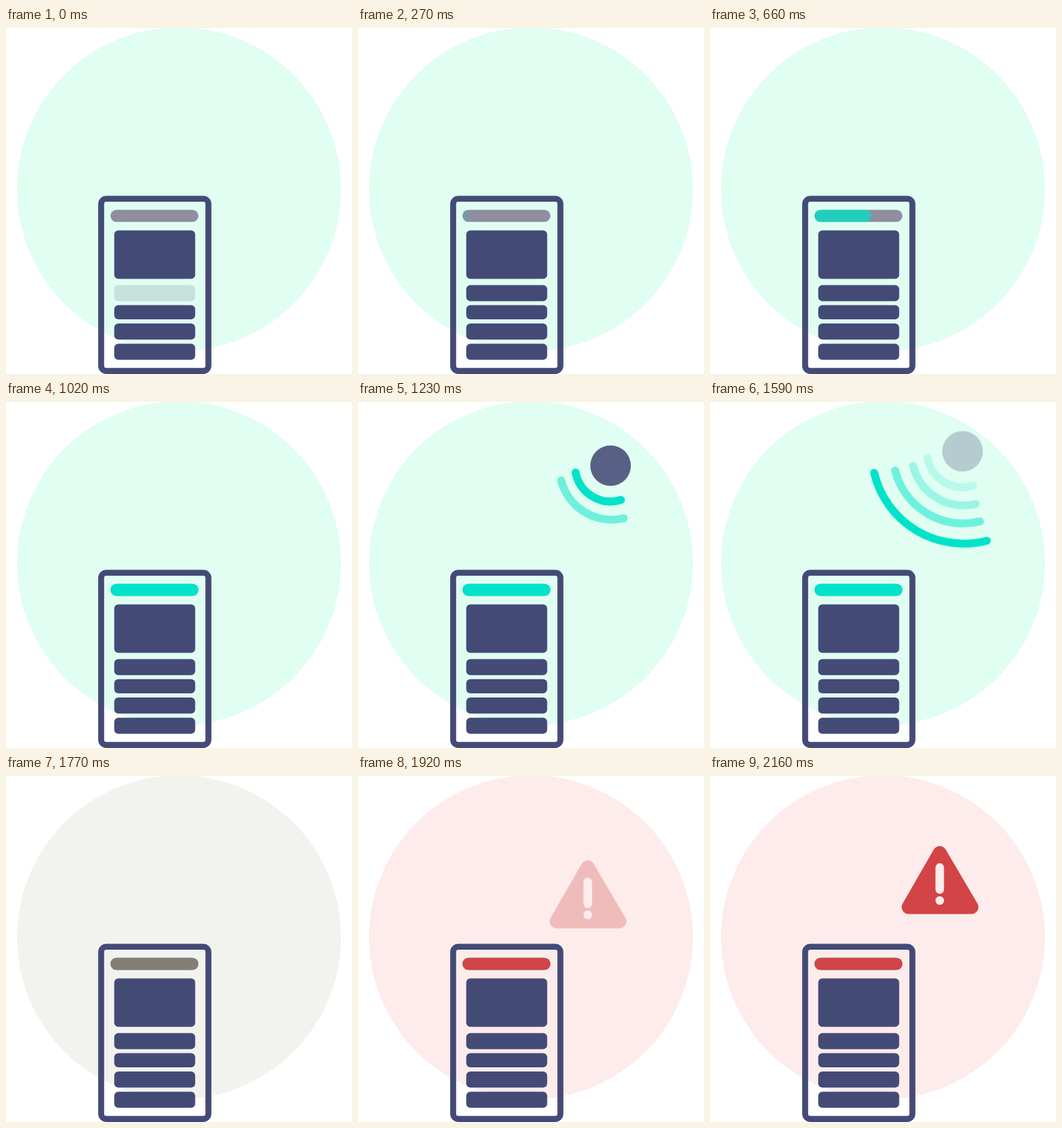
These frames come from a looping animation (500x500 px, 2.67 s). An HTML page:

```html
<!DOCTYPE html>
<html lang="en">
<head>
<meta charset="utf-8">
<title>Phone signal alert</title>
<style>
  :root {
    --navy: #444a76;
    --teal: #00e3c8;
    --red: #d24446;
    --mint: #e0fef2;
    --blush: #fdeceb;
  }
  html, body { margin: 0; width: 100%; height: 100%; overflow: hidden; background: #fff; }
  svg { display: block; width: 100%; height: 100%; }

  /* Every part shares one 2670 ms timeline */
  .anim { animation: 2670ms linear infinite both; }

  .navy { fill: var(--navy); }
  .frame { fill: none; stroke: var(--navy); stroke-width: 8.6; }
  .arcs path { fill: none; stroke: var(--teal); stroke-width: 11.5; stroke-linecap: round; }
  .sign { fill: var(--red); stroke: var(--red); stroke-width: 20; stroke-linejoin: round; }

  #backdrop { animation-name: backdrop; }
  #row { animation-name: row; }
  #fill { fill: var(--teal); animation-name: grow, fill-in; }
  #error { fill: var(--red); animation-name: error; }
  #signal { animation-name: lift; }
  #ball { animation-name: ball; }
  #arc1 { animation-name: arc1; }
  #arc2 { animation-name: arc2; }
  #arc3 { animation-name: arc3; }
  #arc4 { animation-name: arc4; }
  #warning { animation-name: warn-in, warn-rise; }

  @keyframes backdrop {
    0%, 60.67% { fill: var(--mint); }
    69.66%, 100% { fill: var(--blush); }
  }
  @keyframes row {
    0% { opacity: .15; }
    9%, 100% { opacity: 1; }
  }
  @keyframes grow {
    0%, 7.87% { width: 0; }
    34.08%, 100% { width: 127px; }
  }
  @keyframes fill-in {
    0%, 7.87% { opacity: 0; }
    30.34%, 100% { opacity: 1; }
  }
  @keyframes error {
    0%, 60.67% { opacity: 0; }
    69.66%, 100% { opacity: 1; }
  }
  @keyframes lift {
    0% { transform: translateY(0); }
    50% { transform: translateY(0); animation-timing-function: ease-in-out; }
    59.55%, 100% { transform: translateY(-20.7px); }
  }
  @keyframes ball {
    0%, 39.33% { opacity: 0; }
    46.07% { opacity: .87; }
    48.31%, 52.43% { opacity: 1; }
    53.93% { opacity: .84; }
    59.55% { opacity: .28; }
    61.61%, 100% { opacity: 0; }
  }
  @keyframes arc1 {
    0%, 40.45% { opacity: 0; }
    44.94%, 47.75% { opacity: 1; }
    53.93% { opacity: .57; }
    59.55% { opacity: .18; }
    61.8%, 100% { opacity: 0; }
  }
  @keyframes arc2 {
    0%, 43.82% { opacity: 0; }
    46.07% { opacity: .5; }
    48.31%, 52.25% { opacity: 1; }
    53.93% { opacity: .88; }
    59.55% { opacity: .32; }
    62.92%, 100% { opacity: 0; }
  }
  @keyframes arc3 {
    0%, 48.69% { opacity: 0; }
    53.93% { opacity: .88; }
    54.68%, 56.18% { opacity: 1; }
    59.55% { opacity: .52; }
    63.67%, 100% { opacity: 0; }
  }
  @keyframes arc4 {
    0%, 51.69% { opacity: 0; }
    53.93% { opacity: .48; }
    56.18%, 59.93% { opacity: 1; }
    65.17%, 100% { opacity: 0; }
  }
  @keyframes warn-in {
    0%, 69.29% { opacity: 0; }
    78.65%, 100% { opacity: 1; }
  }
  @keyframes warn-rise {
    0% { transform: translateY(21.5px); }
    70.41% { transform: translateY(21.5px); animation-timing-function: ease-in-out; }
    80.9%, 100% { transform: translateY(0); }
  }
</style>
</head>
<body>
<svg viewBox="0 0 500 500">
  <circle id="backdrop" class="anim" cx="250" cy="233" r="234"/>

  <rect class="frame" x="137.5" y="246.8" width="155" height="248.8" rx="7.5"/>
  <rect x="151" y="262.8" width="127" height="17.5" rx="8.75" fill="#8e8ea0"/>
  <rect id="fill" class="anim" x="151" y="262.8" width="127" height="17.5" rx="8.75"/>
  <rect id="error" class="anim" x="151" y="262.8" width="127" height="17.5" rx="8.75"/>
  <g class="navy">
    <rect x="156.4" y="292.4" width="117" height="70.2" rx="6"/>
    <rect id="row" class="anim" x="156.4" y="371.4" width="117" height="23.4" rx="6"/>
    <rect x="156.4" y="400.6" width="117" height="20.4" rx="6"/>
    <rect x="156.4" y="427" width="117" height="23.3" rx="6"/>
    <rect x="156.4" y="456.2" width="117" height="23.3" rx="6"/>
  </g>

  <g id="signal" class="anim">
    <circle id="ball" class="anim navy" cx="365" cy="92" r="29.3"/>
    <g class="arcs">
      <path id="arc1" class="anim" d="M314.5 102A51.5 51.5 0 0 0 380 141.5"/>
      <path id="arc2" class="anim" d="M293.5 113.2A75.5 75.5 0 0 0 384 168"/>
      <path id="arc3" class="anim" d="M267.5 119.7A101.3 101.3 0 0 0 390 193.2"/>
      <path id="arc4" class="anim" d="M237.2 123.2A133.2 133.2 0 0 0 400 221.2"/>
    </g>
  </g>

  <g id="warning" class="anim">
    <path class="sign" d="M332 111.3L287 189.5H378Z"/>
    <path d="M332 132.3V164" stroke="#fdeceb" stroke-width="12.4" stroke-linecap="round"/>
    <circle cx="332" cy="180" r="6.2" fill="#fdeceb"/>
  </g>
</svg>
</body>
</html>
```
